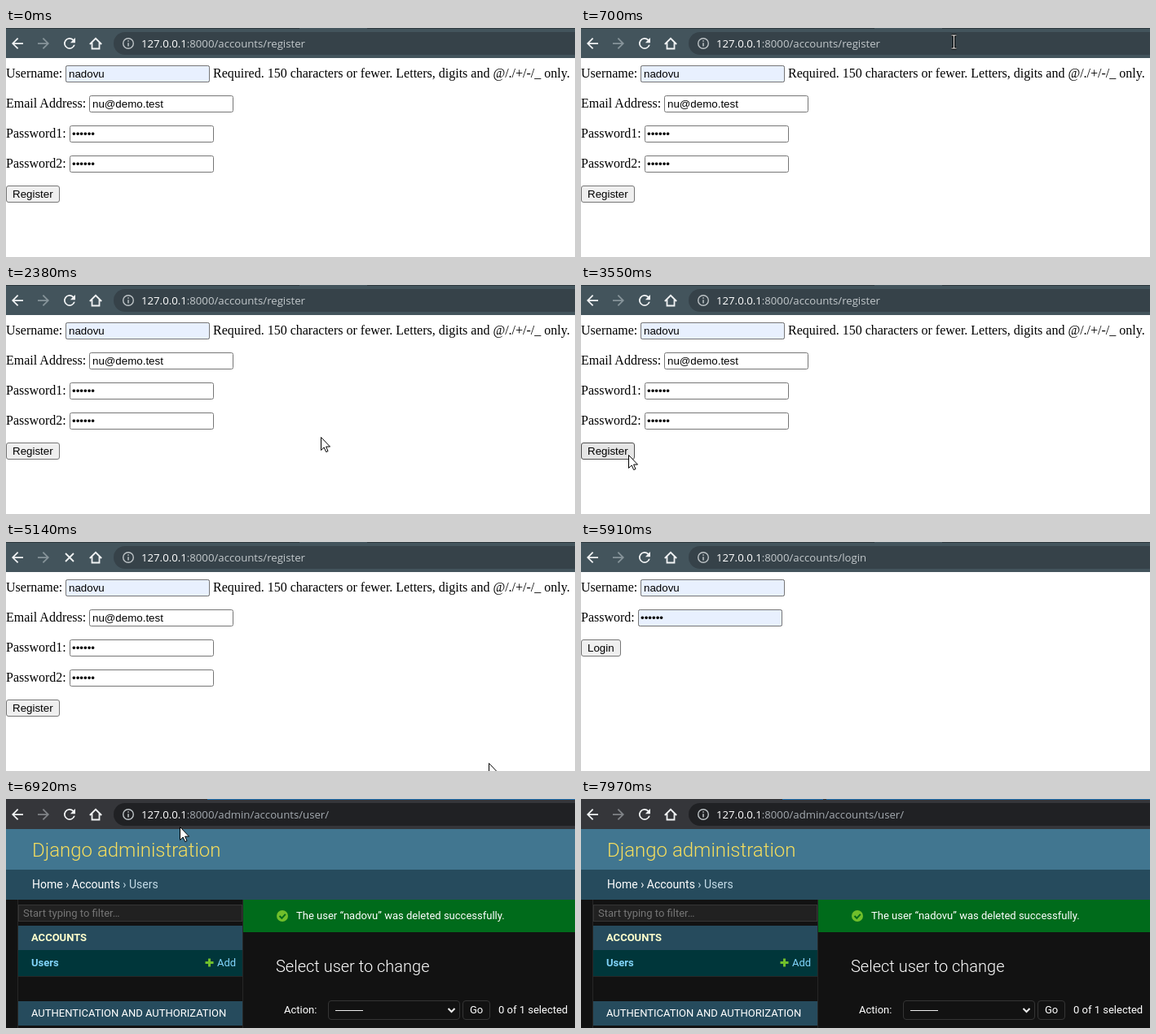
Write an HTML page that moves like this. It is 698 px wide and 282 px high and loops after 8000 ms.

```html
<!DOCTYPE html>
<html lang="en">
<head>
<meta charset="utf-8">
<title>Account registration</title>
<style>
html, body { margin: 0; width: 100%; height: 100%; overflow: hidden; background: #fff; }
svg { display: block; width: 698px; height: 282px; }
text { white-space: pre; }
.serif { font: 16px "Liberation Serif", "Times New Roman", serif; }
.sans { font: 13.333px "Liberation Sans", Arial, sans-serif; }
.url { font: 13.2px "Open Sans", "Noto Sans", sans-serif; }
.ui { font: 13px Roboto, sans-serif; fill: #fff; }
.light { font-weight: 300; }
.hidden { display: none; }
#bar { --tool: #43545c; --pill: #364249; --rest: #c3c9cc; --off: #87949a; }
#bar.dark { --tool: #35363a; --pill: #202124; --rest: #a4aab0; --off: #808387; }
#bar.focus { --pill: #202124; --rest: #fff; }
#tool { fill: var(--tool); }
#pill { fill: var(--pill); }
#bar.focus #pill { stroke: #8ab4f8; stroke-width: 2; }
#rest { fill: var(--rest); }
#next { fill: var(--off); }
</style>
</head>
<body>
<svg viewBox="0 0 698 282" xmlns="http://www.w3.org/2000/svg">
  <rect width="698" height="282" fill="#fff"/>

  <g id="register">
    <g id="registerForm"></g>
    <rect id="button" x=".5" y="194.5" width="65" height="20" rx="2.5"/>
    <text class="sans" x="8" y="209">Register</text>
  </g>

  <g id="login">
    <g id="loginForm"></g>
    <rect x=".5" y="120.5" width="48" height="20" rx="2.5" fill="#efefef" stroke="#767676"/>
    <text class="sans" x="8" y="135">Login</text>
  </g>

  <g id="admin">
    <rect y="37" width="698" height="245" fill="#121212"/>
    <rect y="37" width="698" height="50" fill="#417690"/>
    <rect y="87" width="698" height="37" fill="#264b5d"/>
    <text class="ui light" x="32" y="71" style="font-size:24px;fill:#f5dd5d">Django administration</text>
    <text class="ui" x="32" y="110" style="font-size:14px">Home › Accounts <tspan fill="#c4dce8">› Users</tspan></text>

    <path d="M14.5 124V282M290.5 124V282" stroke="#272727"/>
    <rect x="15.5" y="130.5" width="274" height="20" fill="#212121" stroke="#353535"/>
    <text class="ui" x="21" y="145" style="fill:#757575">Start typing to filter…</text>
    <rect x="15" y="156" width="275" height="30" fill="#264b5d"/>
    <text class="ui" x="31" y="175" style="font-weight:700;fill:#ffc">ACCOUNTS</text>
    <rect x="15" y="186" width="275" height="32" fill="#00363a"/>
    <path d="M15 218.5H290" stroke="#272727"/>
    <text class="ui" x="31" y="206" style="font-weight:700;fill:#81d4fa">Users</text>
    <path d="M244.5 201.5H254.5M249.5 196.5V206.5" stroke="#70bf2b" stroke-width="3"/>
    <text class="ui" x="259" y="206" style="fill:#81d4fa">Add</text>
    <rect x="15" y="249" width="275" height="30" fill="#264b5d"/>
    <text class="ui" x="31" y="268">AUTHENTICATION AND AUTHORIZATION</text>

    <rect x="291" y="124" width="407" height="40" fill="#006b1b"/>
    <circle cx="339" cy="144" r="7" fill="#70bf2b"/>
    <path d="M335.5 144L338.3 146.8 342.8 141.8" fill="none" stroke="#006b1b" stroke-width="2"/>
    <text class="ui" id="notice" x="356" y="148"></text>
    <text class="ui light" x="331" y="213" style="font-size:20px">Select user to change</text>
    <text class="ui" x="341" y="264">Action:</text>
    <rect x="395.5" y="248.5" width="161" height="23" rx="3.5" fill="#121212" stroke="#353535"/>
    <path d="M404 260.5H438" stroke="#eee"/>
    <path d="M542.5 258L546.5 262 550.5 258" fill="none" stroke="#eee" stroke-width="2"/>
    <rect x="560.5" y="248.5" width="33" height="23" rx="3.5" fill="#121212" stroke="#353535"/>
    <text class="ui" x="569" y="264">Go</text>
    <text class="ui" x="604" y="264">0 of 1 selected</text>
  </g>

  <g id="bar">
    <rect id="tool" width="698" height="37"/>
    <path id="tabs" d="M0 .5H360M443 .5H698" stroke="#2d383d"/>
    <path id="darkTabs" d="M247 .5H698" stroke="#1f6fb0"/>
    <rect id="tabGap" x="297" width="4" height="1" fill="#35363a"/>
    <rect id="pill" x="132" y="5" width="600" height="28" rx="14"/>
    <g fill="#f1f3f4">
      <path transform="translate(3.5 8.5) scale(.875)" d="M20 11H7.83l5.59-5.59L12 4l-8 8 8 8 1.41-1.41L7.83 13H20z"/>
      <path id="reload" transform="translate(67.5 8.5) scale(.875)" d="M17.65 6.35A8 8 0 1 0 19.73 14H17.65A6 6 0 1 1 16.22 7.78L13 11h7V4z"/>
    </g>
    <path id="next" transform="translate(56.5 8.5) scale(-.875 .875)" d="M20 11H7.83l5.59-5.59L12 4l-8 8 8 8 1.41-1.41L7.83 13H20z"/>
    <path id="stop" d="M73 14L83 24M83 14L73 24" stroke="#f1f3f4" stroke-width="1.8"/>
    <path d="M102.8 20L110 12.8 117.2 20M105.5 18V25.5H114.5V18" fill="none" stroke="#f1f3f4" stroke-width="1.8"/>
    <circle cx="150" cy="19" r="6.3" fill="none" stroke="#bdc3c6" stroke-width="1.4"/>
    <path d="M150 18.3V22.5M150 15.3V16.8" stroke="#bdc3c6" stroke-width="1.5"/>
    <rect id="selection" x="166" y="9" width="201" height="21" fill="#4f6f9f"/>
    <text class="url" x="166" y="24" fill="#fff">127.0.0.1<tspan id="rest"></tspan></text>
  </g>

  <circle id="click" r="12" fill="#ff0" fill-opacity=".47"/>
  <path id="arrow" d="M.5 .5V16.5L4.2 13 6.7 18.6 9 17.6 6.6 12.1H11.5Z" fill="#fff" stroke="#000"/>
  <g id="beam" fill="none">
    <path d="M-3 -8H3M0 -8V8M-3 8H3" stroke="#000" stroke-width="3"/>
    <path d="M-3 -8H3M0 -8V8M-3 8H3" stroke="#fff"/>
  </g>
</svg>
<script>
const LOOP = 8000;
const USER = "nadovu", MAIL = "nu@demo.test", DOTS = "••••••";
const $ = id => document.getElementById(id);
const show = (id, on) => $(id).classList.toggle("hidden", !on);

// One labelled input: label, left edge, top edge, value, autofilled, hint
function field([label, x, y, value, filled, hint = ""]) {
  const box = fill => `<rect x="${x + .5}" y="${y + .5}" width="176" height="20" rx="2" fill="${fill}" stroke="#767676"/>`;
  const text = `<text class="sans" x="${x + (value === DOTS ? 3 : 4)}" y="${y + 15}">${value}</text>`;
  return `<text class="serif" y="${y + 15}">${label}:</text>` + box("#fff") +
    `<g class="${filled ? "auto" : ""}">${filled ? box("#e8f0fe") : ""}${text}</g>` +
    `<text class="serif" x="${x + 181}" y="${y + 15}">${hint}</text>`;
}

$("registerForm").innerHTML = [
  ["Username", 73, 46, USER, true, "Required. 150 characters or fewer. Letters, digits and @/./+/-/_ only."],
  ["Email Address", 102, 83, MAIL],
  ["Password1", 78, 120, DOTS],
  ["Password2", 78, 157, DOTS]
].map(field).join("");
$("loginForm").innerHTML = [
  ["Username", 73, 46, USER, true],
  ["Password", 70, 83, DOTS, true]
].map(field).join("");
$("notice").textContent = `The user “${USER}” was deleted successfully.`;
const autofill = document.querySelectorAll("#loginForm .auto");

// Pointer moves: first step, last step, step count, start, end, optional bend
const moves = [
  [130, 230, 3, [596, 238], [469, 78]],
  [380, 700, 7, [469, 78], [457, 17]],
  [1760, 1980, 5, [457, 17], [386, 187]],
  [2630, 2780, 4, [386, 187], [134, 236]],
  [3080, 3550, 9, [134, 236], [58, 209]],
  [4580, 4780, 5, [58, 209], [442, 212], [230, 45]],
  [4990, 5140, 4, [442, 212], [592, 272]],
  [5440, 5440, 1, [592, 272], [612, 320]],
  [6420, 7140, 14, [560, 310], [72, 13], [320, 5]],
  [7190, 7240, 2, [72, 13], [79, 15]],
  [7740, 7740, 1, [79, 15], [79, -40]]
];
// Click marks: from, to, x, y
const clicks = [[1050, 1200, 455, 17], [2230, 2380, 386, 187], [4230, 4380, 58, 209]];

function pointer(t) {
  const move = moves.filter(m => t >= m[0]).pop();
  if (!move) return [0, -40];
  const [t0, t1, n, a, b, bend] = move;
  const gap = (t1 - t0) / Math.max(1, n - 1);
  const step = gap ? Math.floor((t - t0) / gap + 1e-6) + 1 : n;
  const p = Math.min(1, step / n);
  return a.map((v, i) => {
    const mid = bend ? bend[i] : (v + b[i]) / 2;
    return Math.round((1 - p) ** 2 * v + 2 * p * (1 - p) * mid + p * p * b[i]);
  });
}

function draw(t) {
  const page = t < 5540 ? "register" : t < 6370 ? "login" : "admin";
  const dark = page === "admin";
  const focus = t >= 1050 && t < 2230;
  const loading = t >= 4330 && t < 5740;
  for (const id of ["register", "login", "admin"]) show(id, id === page);
  $("bar").className.baseVal = (dark ? "dark " : "") + (focus ? "focus" : "");
  $("rest").textContent = ":8000/" + (dark ? "admin/accounts/user/" : "accounts/" + page);
  show("tabs", !dark);
  show("darkTabs", dark);
  show("tabGap", t >= 7970);
  show("reload", !loading);
  show("stop", loading);
  show("selection", t >= 1200 && t < 2230);
  autofill.forEach(g => g.classList.toggle("hidden", t < 5910));

  const [x, y] = pointer(t);
  const hover = x < 66 && y >= 194 && y < 215;
  const press = t >= 4230 && t < 4330;
  $("button").setAttribute("fill", press ? "#f5f5f5" : hover ? "#e5e5e5" : "#efefef");
  $("button").setAttribute("stroke", press ? "#8d8d8d" : hover ? "#4f4f4f" : "#767676");

  const overBar = x > 131 && y > 4 && y < 34;
  show("arrow", !overBar);
  show("beam", overBar);
  $("arrow").setAttribute("transform", `translate(${x} ${y})`);
  $("beam").setAttribute("transform", `translate(${x + .5} ${y})`);

  const hit = clicks.find(c => t >= c[0] && t < c[1]);
  show("click", hit);
  if (hit) $("click").setAttribute("transform", `translate(${hit[2]} ${hit[3]})`);
}

const start = performance.now();
function tick() {
  draw((performance.now() - start) % LOOP);
  requestAnimationFrame(tick);
}
draw(0);
requestAnimationFrame(tick);
</script>
</body>
</html>
```
